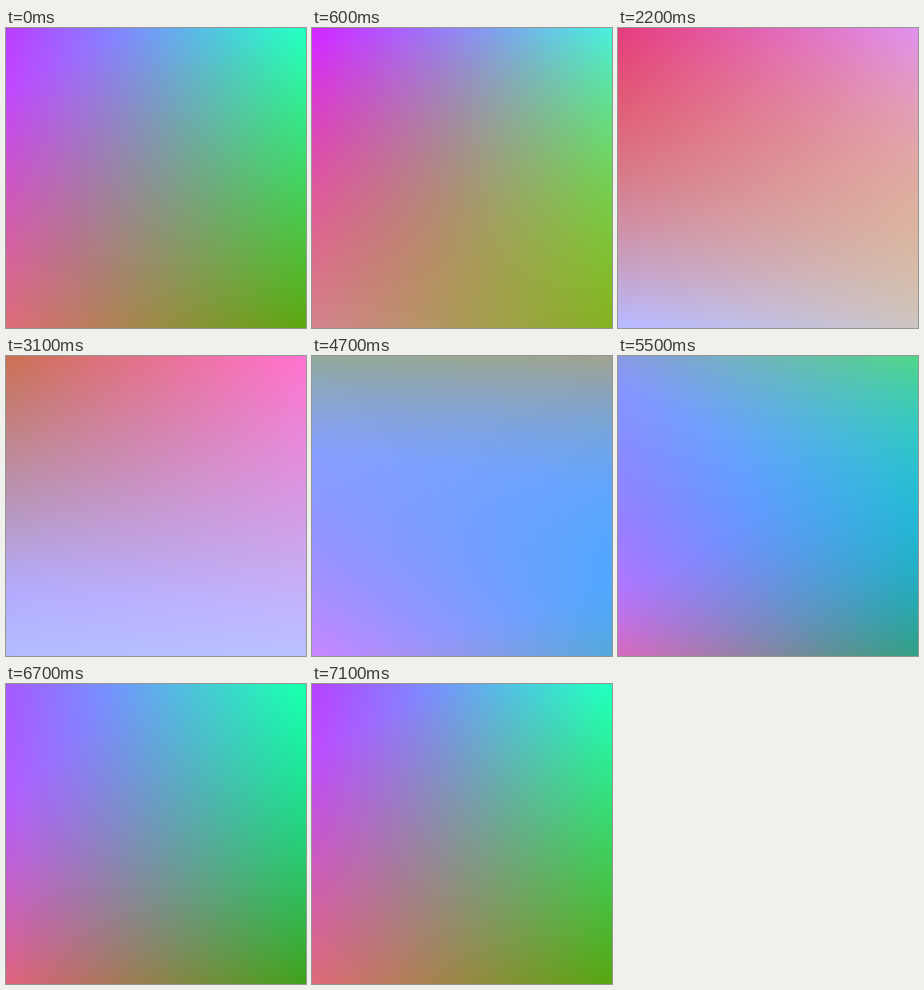
These frames come from a looping animation (300x300 px, 7.2 s). An HTML page with a canvas:

```html
<!DOCTYPE html>
<html lang="en">
<head>
<meta charset="utf-8">
<title>Drifting colour field</title>
<style>
  html, body { margin: 0; width: 100%; height: 100%; overflow: hidden; }
  canvas { display: block; width: 100%; height: 100%; }
</style>
</head>
<body>
<canvas width="300" height="300"></canvas>
<script>
const SIZE = 300, LOOP = 7200, STEP = 100;

// An RGB colour whose channels each swing around a mean and peak at an angle of the loop.
const oscillator = (mean, swing, peak) => angle =>
  mean.map((m, ch) => m + swing[ch] * Math.cos((angle - peak[ch]) * Math.PI / 180));

const topLeft = oscillator([185, 100, 190], [48, 70, 110], [88, 235, 345]);
const topRight = oscillator([140, 188, 190], [118, 75, 55], [155, 345, 85]);
const bottomLeft = oscillator([202, 143, 215], [23, 48, 95], [325, 135, 170]);
const bottomRight = oscillator([125, 178, 145], [80, 20, 130], [115, 120, 178]);
// Added on top of the corner blend, strongest along the middle row.
const middle = oscillator([-8, 0, 8], [24, 0, 75], [66, 0, 257]);

const ctx = document.querySelector("canvas").getContext("2d");
const image = ctx.createImageData(SIZE, SIZE);
const mix = (a, b, u) => a + (b - a) * u;

function draw(time) {
  const angle = time / LOOP * 360;
  const [tl, tr, bl, br, mid] =
    [topLeft, topRight, bottomLeft, bottomRight, middle].map(color => color(angle));
  image.data.fill(255);
  for (let y = 0; y < SIZE; y++) {
    const v = (y + 0.5) / SIZE, bulge = 4 * v * (1 - v);
    for (let ch = 0; ch < 3; ch++) {
      const left = mix(tl[ch], bl[ch], v) + bulge * mid[ch];
      const right = mix(tr[ch], br[ch], v) + bulge * mid[ch];
      for (let x = 0; x < SIZE; x++) {
        image.data[(y * SIZE + x) * 4 + ch] = mix(left, right, (x + 0.5) / SIZE);
      }
    }
  }
  ctx.putImageData(image, 0, 0);
}

const start = performance.now();
let shown = -1;
function tick() {
  const time = Math.floor((performance.now() - start) / STEP) * STEP % LOOP;
  if (time !== shown) draw(shown = time);
  requestAnimationFrame(tick);
}
tick();
</script>
</body>
</html>
```
